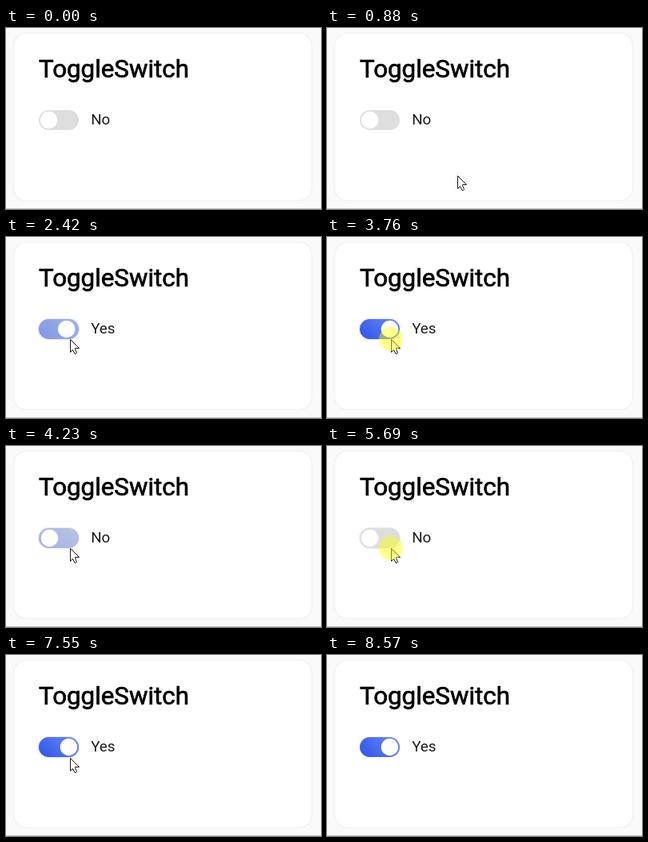
Write an HTML page that moves like this. It is 394 px wide and 227 px high and loops after 9850 ms.

```html
<!DOCTYPE html>
<html lang="en">
<head>
<meta charset="utf-8">
<title>ToggleSwitch</title>
<style>
  html, body { margin: 0; width: 100%; height: 100%; overflow: hidden; background: #fafafa; }
  svg { display: block; width: 394px; height: 227px; font-family: Roboto, sans-serif; }
</style>
</head>
<body>
<svg viewBox="0 0 394 227">
  <defs>
    <linearGradient id="blue" gradientUnits="userSpaceOnUse" x1="47" y1="134" x2="85" y2="97">
      <stop stop-color="#2f53e8"/>
      <stop offset="1" stop-color="#6a8cf7"/>
    </linearGradient>
  </defs>
  <rect width="394" height="227" fill="#fafafa"/>
  <rect x="9.5" y="6.5" width="373" height="210" rx="16" fill="#fff" stroke="#f3f3f3" stroke-width="1.6"/>
  <rect y="226" width="394" height="1" fill="#c2c2c2"/>
  <text x="41" y="62" font-size="31.3" stroke="#000" stroke-width=".7">ToggleSwitch</text>
  <g id="track">
    <rect x="41" y="103" width="50" height="25" rx="12.5" fill="#dedede"/>
    <rect id="fill" x="41" y="103" width="50" height="25" rx="12.5" fill="url(#blue)"/>
  </g>
  <circle id="knob" cy="115.5" r="10.7" fill="#fff"/>
  <text id="label" x="106.2" y="121" font-size="18.8" fill="#1c1c1c"></text>
  <path id="cursor" d="M.5 .5V16.5L3.5 13.5L6 18.5H7.5L8.5 17.5L6.5 12.5V11.5H11.5Z" fill="#fff" stroke="#000" stroke-width=".9"/>
  <circle id="press" cx="80" cy="128" r="15" fill="#ff0" fill-opacity=".45"/>
</svg>
<script>
const LOOP = 9850;
const CLICKS = [
  { down: 2020, up: 2150, on: true },
  { down: 3760, up: 3880, on: false },
  { down: 5690, up: 5750, on: true },
];
const FADE = 520;

const $ = id => document.getElementById(id);
const [track, fill, knob, label, press, cursor] =
  ["track", "fill", "knob", "label", "press", "cursor"].map($);

const progress = (t, from, to) => Math.min(1, Math.max(0, (t - from) / (to - from)));
const easeOut = p => 1 - (1 - p) ** 3;
const easeInOut = p => p * p * (3 - 2 * p);
const mix = (a, b, p) => a + (b - a) * p;
const show = (node, visible) => node.setAttribute("visibility", visible ? "visible" : "hidden");

function cursorAt(t) {
  if (t < 1550) {
    const p = easeInOut(progress(t, 480, 1410));
    return [mix(218, 80, p), mix(222, 129, p)];
  }
  if (t < 7550) return [80, 128];
  const p = easeInOut(progress(t, 7550, 8500));
  return [mix(80, 311, p), mix(129, 222, p)];
}

function draw(t) {
  const last = CLICKS.filter(c => t >= c.up).pop();
  const on = last ? last.on : false;
  const p = last ? progress(t, last.up, last.up + FADE) : 1;
  const toward = v => on ? v : 1 - v;

  fill.setAttribute("opacity", toward(p));
  knob.setAttribute("cx", mix(53.6, 78.4, toward(easeOut(p))));
  label.textContent = on ? "Yes" : "No";

  const hover = t >= 1410 && t < 7680;
  const glow = on ? "rgba(70,100,235,.45)" : "rgba(0,0,0,.2)";
  track.style.filter = hover ? `drop-shadow(0 0 1px ${glow})` : "none";

  show(press, CLICKS.some(c => t >= c.down && t < c.up));
  show(cursor, t >= 480 && t < 8570);
  cursor.setAttribute("transform", `translate(${cursorAt(t).map(Math.round)})`);
}

function tick() {
  draw(performance.now() % LOOP);
  requestAnimationFrame(tick);
}
tick();
</script>
</body>
</html>
```
